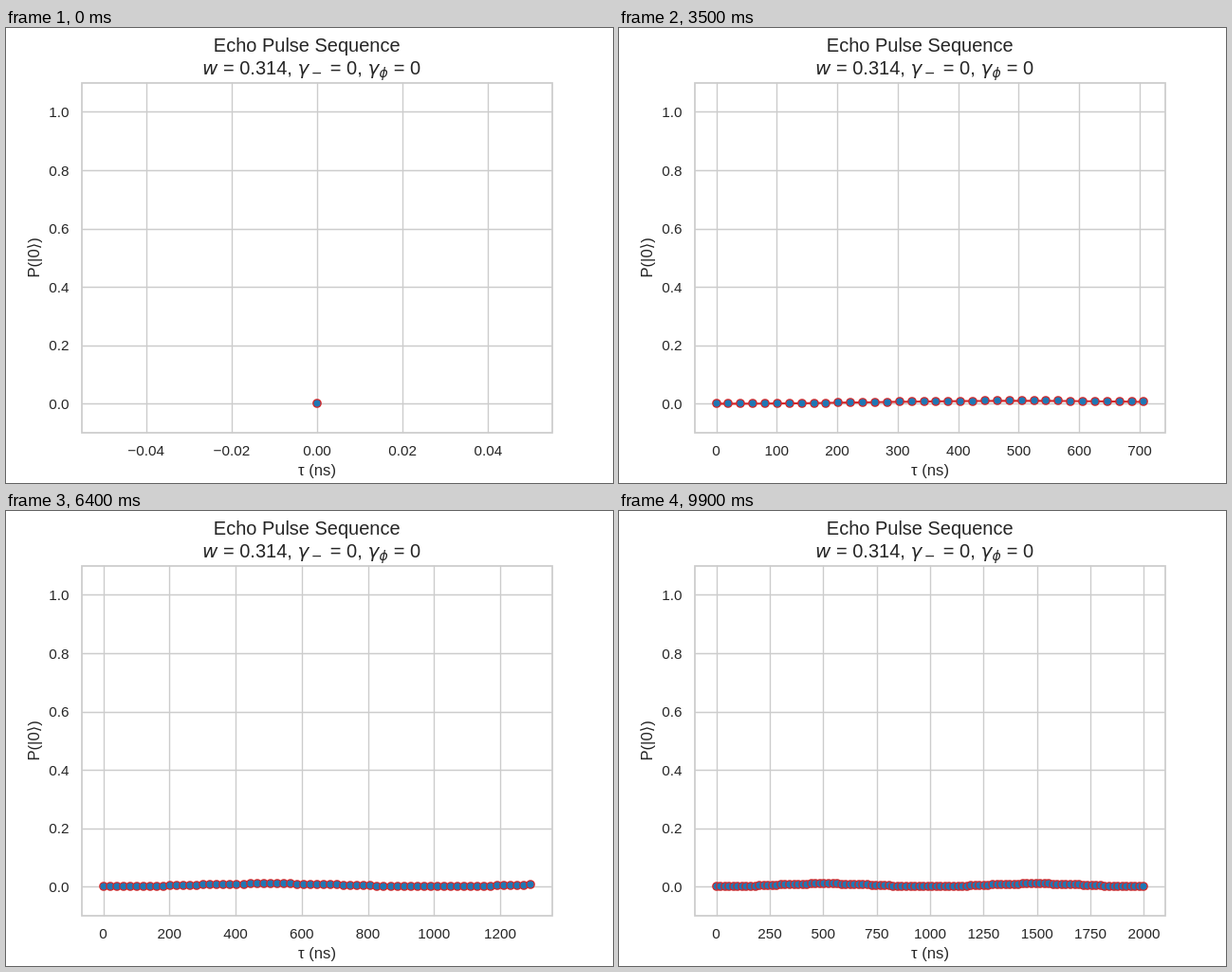
Write an HTML page with a canvas that moves like this. It is 640x480 px and loops after 10 s.

```html
<!DOCTYPE html>
<html lang="en">
<head>
<meta charset="utf-8">
<title>Echo Pulse Sequence</title>
<style>
  html, body { margin: 0; width: 100%; height: 100%; overflow: hidden; background: #fff; }
  canvas { display: block; }
</style>
</head>
<body>
<canvas id="stage" width="640" height="480"></canvas>
<script>
const ctx = document.getElementById('stage').getContext('2d');
const STEPS = 100, STEP_MS = 100, T_MAX = 2000;
const LEFT = 80, RIGHT = 576, TOP = 57.6, BOTTOM = 427.2;
const SANS = '"Liberation Sans", Arial, "DejaVu Sans", sans-serif';
const MATH = '"DejaVu Sans", sans-serif';
const INK = '#262626', GRID = '#cccccc', RED = '#d62728', BLUE = '#1f77b4';

const tau = i => i * T_MAX / (STEPS - 1);
const prob = t => 0.0099 * Math.sin(Math.PI * t / 1000) ** 2;
const yPos = p => BOTTOM - (p + 0.1) / 1.2 * (BOTTOM - TOP);
const snap = v => Math.floor(v + 0.5);

function text(str, x, y, size, align = 'left', font = SANS, style = '') {
  ctx.font = `${style} ${size}px ${font}`;
  ctx.textAlign = align;
  ctx.fillStyle = INK;
  ctx.fillText(str, x, y);
}

function line(x1, y1, x2, y2) {
  ctx.beginPath();
  ctx.moveTo(x1, y1);
  ctx.lineTo(x2, y2);
  ctx.stroke();
}

function stroke(color, width) {
  ctx.strokeStyle = color;
  ctx.lineWidth = width;
}

// Smallest round step giving at most nine intervals
function tickStep(range) {
  const raw = range / 9;
  const power = 10 ** Math.floor(Math.log10(raw));
  return [1, 2, 2.5, 5, 10].find(m => m * power >= raw * 0.999999) * power;
}

function titles() {
  const math = (str, x, y, size) => text(str, x, y, size, 'left', MATH, 'italic');
  text('Echo Pulse Sequence', 218.8, 25, 20);
  math('w', 207, 49, 20);
  text('= 0.314,', 229, 49, 20);
  math('γ', 307.5, 49, 20);
  text('−', 322, 52, 14, 'left', MATH);
  text('= 0,', 341.8, 49, 20);
  math('γ', 381.4, 49, 20);
  math('ϕ', 393.4, 52, 14);
  text('= 0', 408.8, 49, 20);
  text('τ (ns)', 328, 472, 16.67, 'center');
  ctx.save();
  ctx.translate(34.5, 242.4);
  ctx.rotate(-Math.PI / 2);
  text('P(|0⟩)', 0, 0, 16.67, 'center');
  ctx.restore();
}

function axes(lo, hi, xPos) {
  const step = tickStep(hi - lo);
  const digits = step < 1 ? 2 : step === 2.5 ? 1 : 0;
  stroke(GRID, 1.39);
  for (let n = Math.ceil(lo / step); n * step <= hi; n++) {
    const x = xPos(n * step), gx = snap(x) + 0.5;
    line(gx, TOP, gx, BOTTOM);
    text((n * step).toFixed(digits).replace('-', '−'), x, 451, 15.28, 'center');
  }
  for (let n = 0; n <= 5; n++) {
    const y = yPos(n / 5), gy = snap(y) + 0.5;
    line(LEFT, gy, RIGHT, gy);
    text((n / 5).toFixed(1), 66.5, snap(y + 5.5), 15.28, 'right');
  }
}

function curve(last, xPos) {
  const points = Array.from({ length: last + 1 }, (_, i) => [xPos(tau(i)), yPos(prob(tau(i)))]);
  if (last) {
    stroke(RED, 2.08);
    ctx.lineJoin = ctx.lineCap = 'round';
    ctx.beginPath();
    points.forEach(([x, y]) => ctx.lineTo(x, y));
    ctx.stroke();
    ctx.lineCap = 'butt';
  }
  stroke(RED, 1.39);
  ctx.fillStyle = BLUE;
  for (const [x, y] of points) {
    ctx.beginPath();
    ctx.arc(snap(x), snap(y), 4.17, 0, 2 * Math.PI);
    ctx.fill();
    ctx.stroke();
  }
}

function draw(now) {
  const last = Math.floor(now / STEP_MS) % STEPS;
  const end = tau(last);
  const lo = last ? -0.05 * end : -0.055;
  const hi = last ? 1.05 * end : 0.055;
  const xPos = t => LEFT + (t - lo) / (hi - lo) * (RIGHT - LEFT);

  ctx.fillStyle = '#fff';
  ctx.fillRect(0, 0, 640, 480);
  axes(lo, hi, xPos);
  curve(last, xPos);
  ctx.lineJoin = 'miter';
  stroke(GRID, 1.74);
  ctx.strokeRect(LEFT, snap(TOP), RIGHT - LEFT, snap(BOTTOM) - snap(TOP));
  titles();
}

function loop() {
  draw(performance.now());
  requestAnimationFrame(loop);
}
loop();
</script>
</body>
</html>
```
